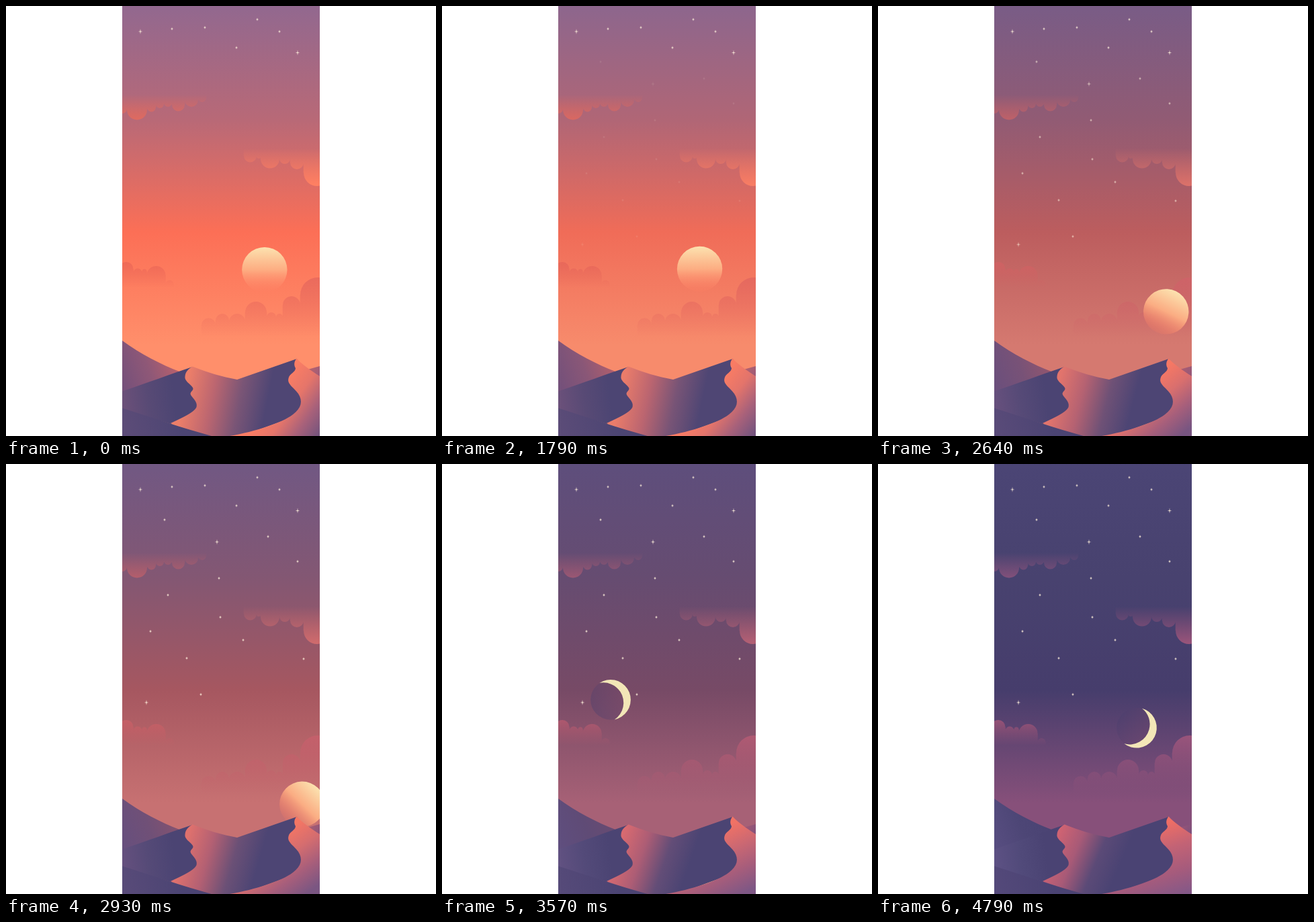
Write an HTML page with a canvas that moves like this. It is 640 px wide and 640 px high and loops after 8 s.

```html
<!DOCTYPE html>
<html lang="en">
<head>
<meta charset="utf-8">
<title>Desert dusk</title>
<style>
html, body { margin: 0; height: 100%; overflow: hidden; background: #fff; }
canvas { display: block; width: 640px; height: 640px; }
</style>
</head>
<body>
<canvas width="640" height="640"></canvas>
<script>
const ctx = document.querySelector('canvas').getContext('2d');
const LOOP = 8000, START = 1210, STEP = 71.6, STEPS = 50;
const LEFT = 173, WIDTH = 294;
const WHEEL = { x: 272.2, y: 518.6, r: 169, rest: -48.2, turn: 140 };

// The first seven shine from the start, every sixth is large
const stars = [[200, 38], [247, 34], [296, 32], [374, 20], [407, 38], [343, 62], [434, 69.5],
  [236, 83], [390, 108], [434, 145], [317, 170], [241, 195], [314, 116], [319, 228], [215, 249],
  [353, 262], [269, 289], [443, 290], [209, 355], [290, 343]];

// Evenly spaced colours are listed as day and night
const sky = { day: ['92688f', 'b86977', 'fc6f56', 'ff8f6b'], night: ['4b4575', '48426f', '463d6c', '87507a'] };

// Puffs sit side by side from x and reach from their centres to the faded edge
const clouds = [
  cloud(166, 168, 132, 'de6a60', '80507a', [[7, 153], [15, 154.5], [6.5, 151], [6, 146], [6, 144], [9.5, 147], [10, 140], [6, 137]]),
  cloud(354, 267, 212, 'ff8062', '99547a', [[9.5, 223], [3, 224], [14, 227.5], [8, 227], [10, 233], [20, 248]]),
  cloud(168.5, 381, 419, 'ee6a58', '965276', [[10.5, 391.5], [6.5, 397], [3.5, 395], [14, 401], [6, 414]]),
  cloud(291, 404, 492, 'ea6b5d', '9a547b', [[10.5, 475], [10, 468], [12, 470], [16, 456], [7, 463], [5, 463], [13, 445], [26, 430]])
];

const dunes = [
  // Far right
  dune('M467 536L449 541 467 556Z', [449, 540, 467, 550], 'b9636c a05c78', '9a5678 7a4f7c'),
  // Far left
  dune('M173 498C200 518 232 534 258 544L280 546V580H173Z', [173, 560, 256, 530], '76507a 8f5877 bb616c', '574d80 4d4676 4a4373'),
  // Left shade
  dune('M173 573.5C210 561 245 548 277.5 537L286 545V610L245 622 173 600Z', [173, 590, 250, 580], '6c5079 584a75 4c4573', '5d5184 514a7a 4a4373'),
  // Middle
  dune('M277.5 536.5C298 545 322 552 344 556L433 525 446 560V605L350 640H300L245 621C262 613 280 605 283.5 597C286 588 275 582 274.5 577C275 573 280 572 278 568C274 562 265 558 266.5 551C267 544 272 540 277.5 536.5Z',
    [268, 570, 388, 594], 'ec7e69 bc6670 7a5576 4f4674', 'd06372 a85a77 5b4a77 4a4373', [270, 545, 365, 585]),
  // Right
  dune('M432.5 524.5C440 533 453 542 467 551V640H333C372 633 410 621 427 608C440 598 442 588 435 577C428 567 418 563 420.5 554C422 547 431 545 431 539C428 534 429 529 432.5 524.5Z',
    [425, 545, 497, 595], 'fa7d64 e5756a a8617a 73547d', 'ee6e65 c36375 a65b7c 825888', [425, 535, 460, 640]),
  // Front left
  dune('M173 598.5C220 613 262 628 306 640H173Z', [173, 640, 260, 622], '5d4c78 4c4573', '54497a 4a4373')
];

function cloud(x, edge, fade, day, night, puffs) {
  const path = new Path2D();
  for (const [r, y] of puffs) {
    path.moveTo(x + 2 * r, y);
    path.arc(x + r, y, r, 0, 7);
    path.rect(x - .3, Math.min(y, fade), 2 * r + .6, Math.abs(fade - y));
    x += 2 * r;
  }
  return { path, edge, fade, day, night };
}

function dune(outline, axis, day, night, nightAxis = axis) {
  return { path: new Path2D(outline), axis, nightAxis, day: day.split(' '), night: night.split(' ') };
}

const lerp = (a, b, p) => a + (b - a) * p;
const channels = hex => [0, 2, 4].map(i => parseInt(hex.slice(i, i + 2), 16));

function mix(day, night, p, alpha = 1) {
  const b = channels(night);
  return `rgba(${channels(day).map((v, i) => Math.round(lerp(v, b[i], p)))},${alpha})`;
}

function gradient(axis, colours) {
  const g = ctx.createLinearGradient(...axis);
  colours.forEach((c, i) => g.addColorStop(i / (colours.length - 1), c));
  return g;
}

const blend = (axis, { day, night }, p) => gradient(axis, day.map((c, i) => mix(c, night[i], p)));

function drawStar(x, y, size) {
  const w = size * .85, k = .55;
  ctx.beginPath();
  for (let i = 0; i < 4; i++) {
    const c = Math.round(Math.cos(i * Math.PI / 2)), s = Math.round(Math.sin(i * Math.PI / 2));
    ctx.lineTo(x + c * w, y + s * size);
    ctx.lineTo(x + (c - s) * k, y + (s + c) * k);
  }
  ctx.fill();
}

function onWheel(degrees, spin, draw) {
  const a = degrees * Math.PI / 180;
  ctx.save();
  ctx.translate(WHEEL.x + WHEEL.r * Math.cos(a), WHEEL.y + WHEEL.r * Math.sin(a));
  ctx.rotate(spin * Math.PI / 180);
  draw();
  ctx.restore();
}

function disc(r, fill) {
  ctx.fillStyle = fill;
  ctx.beginPath();
  ctx.arc(0, 0, r, 0, 7);
  ctx.fill();
}

function drawSun() {
  disc(33.7, gradient([0, -34, 0, 34], ['#fce3b0', 'rgba(253,176,132,.95)', 'rgba(255,125,97,.15)']));
}

function drawMoon() {
  disc(29.7, gradient([-30, 0, 20, 0], ['rgba(74,62,110,.4)', 'rgba(112,70,106,.35)']));
  const shift = 11.5, tip = Math.acos(shift / 60);
  ctx.fillStyle = '#f3e6b7';
  ctx.beginPath();
  ctx.arc(0, 0, 30, tip - Math.PI, Math.PI - tip);
  ctx.arc(-shift, 0, 30, tip, -tip, true);
  ctx.fill();
}

function draw(time) {
  // The motion advances in even steps
  const step = Math.floor((time - START) / STEP + .15);
  const u = Math.min(1, Math.max(0, step / STEPS));
  const dusk = u * u * (3 - 2 * u);
  // The wheel leans back a little, then catches up
  const turn = WHEEL.turn * (dusk - 4.8 * u ** 2 * (1 - u) ** 3);

  ctx.clearRect(0, 0, 640, 640);
  ctx.save();
  ctx.beginPath();
  ctx.rect(LEFT, 0, WIDTH, 640);
  ctx.clip();

  // The last quarter-point of the sky lies on the horizon
  ctx.fillStyle = blend([0, 0, 0, 505], sky, dusk);
  ctx.fillRect(LEFT, 0, WIDTH, 640);

  ctx.fillStyle = '#fff0dc';
  stars.forEach(([x, y], i) => {
    ctx.globalAlpha = i < 7 ? .95 : Math.min(1, dusk * 2.1);
    drawStar(x, y, i % 6 ? 2.6 : 4);
  });
  ctx.globalAlpha = 1;

  for (const { path, edge, fade, day, night } of clouds) {
    ctx.fillStyle = gradient([0, edge, 0, fade], [mix(day, night, dusk), mix(day, night, dusk, 0)]);
    ctx.fill(path);
  }

  onWheel(WHEEL.rest + turn, turn, drawSun);
  const moon = WHEEL.rest - WHEEL.turn + turn;
  onWheel(moon, moon + 75, drawMoon);

  for (const d of dunes) {
    ctx.fillStyle = blend(d.axis.map((v, i) => lerp(v, d.nightAxis[i], dusk)), d, dusk);
    ctx.fill(d.path);
  }
  ctx.restore();
}

const begin = performance.now();
function tick() {
  draw((performance.now() - begin) % LOOP);
  requestAnimationFrame(tick);
}
tick();
</script>
</body>
</html>
```
